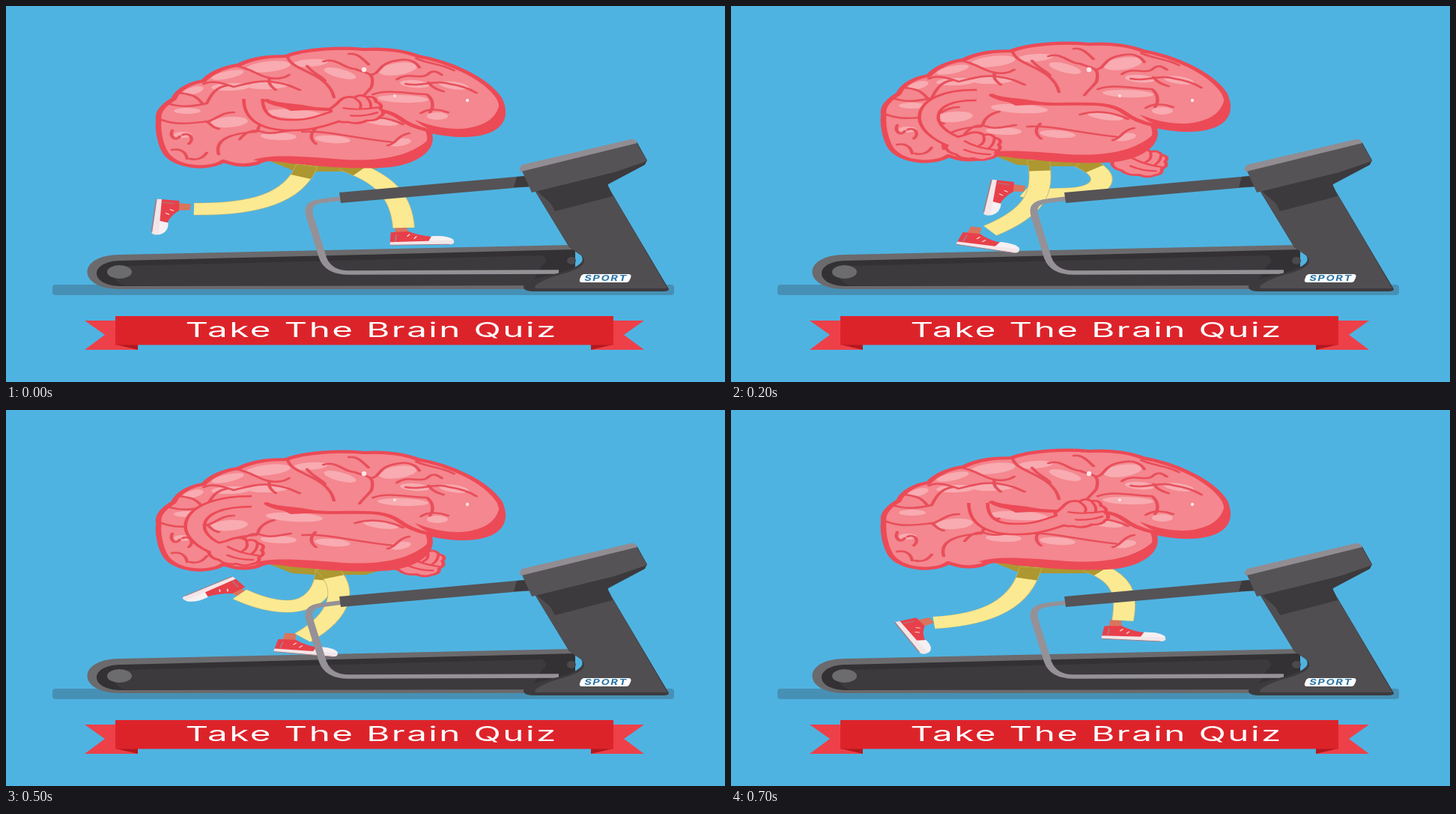
Recreate the animation shown at these times as an HTML page. Size 960 by 502 pixels, loop 800 ms.

```html
<!DOCTYPE html>
<html lang="en">
<head>
<meta charset="utf-8">
<title>Take The Brain Quiz</title>
<style>
  html, body { margin: 0; width: 100%; height: 100%; overflow: hidden; background: #4fb3e1; }
  svg { display: block; width: 100vw; height: 100vh; }
  text { font-family: Inter, "Open Sans", sans-serif; text-anchor: middle; }
</style>
</head>
<body>
<svg id="stage" viewBox="0 0 960 502" preserveAspectRatio="none"></svg>
<script>
const K = 1.8;          // the drawing is wider than tall, pens included
const STEP = 100;
const PINK = '#f4878f', RED = '#ec4a56', LINE = '#e84f5b', SHINE = '#f8abb1';
const YELLOW = '#fbea92', OLIVE = '#ad9730';
const GREY = '#555356', DARK = '#3c3a3d', EDGE = '#6b6a6d', STEEL = '#959197';

const fill = (d, color) => `<path d="${d}" fill="${color}"/>`;
const squeeze = d => d.replace(/(-?[\d.]+),/g, (m, x) => (x / K).toFixed(2) + ',');
const pen = (d, color, w, more = '') =>
  `<path d="${squeeze(d)}" transform="scale(${K},1)" fill="none" stroke="${color}" stroke-width="${w}" ${more}/>`;
const line = (d, w = 2.5, color = LINE) => pen(d, color, w, 'stroke-linecap="round" stroke-linejoin="round"');
const shine = ([x, y, rx, ry, a]) =>
  `<ellipse rx="${rx}" ry="${ry}" transform="translate(${x},${y}) rotate(${a})" fill="${SHINE}"/>`;
const place = (x, y, a, body, size = 1) =>
  `<g transform="translate(${x},${y}) scale(${K * size},${size}) rotate(${a})">${body}</g>`;

// ---- brain
const outline = 'M204,152 C201,140 214,130 224,124 C229,111 248,102 264,100 C272,90 292,81 310,79 ' +
  'C332,68 356,67 374,67 C400,57 445,55 478,58 C510,56 535,61 550,67 C590,74 640,95 659,124 ' +
  'C672,154 655,172 610,173 C592,173 577,170 564,167 C574,190 548,212 500,214 C460,216 420,212 380,208 ' +
  'C362,204 347,203 335,210 C315,215 302,211 290,207 C270,220 226,216 213,196 C206,185 202,165 204,152 Z';

const folds = [
  'M376,68 C382,88 430,88 438,122',
  'M402,80 C412,92 420,92 426,100',
  'M424,74 C440,68 452,84 466,84 C478,90 494,86 488,108 C484,114 478,118 472,126',
  'M487,92 C502,90 494,76 526,72 C540,70 548,76 552,82',
  'M458,64 C468,62 476,70 484,78',
  'M490,118 C510,110 540,118 562,118 C570,124 572,134 566,142',
  'M554,143 C566,136 580,138 590,142',
  'M522,98 C536,88 552,98 562,92 C570,84 576,88 582,92',
  'M534,104 C554,108 574,98 592,104 C606,106 618,110 628,116',
  'M564,102 C570,110 578,112 584,114',
  'M548,70 C566,78 584,78 598,86',
  'M216,130 C234,136 250,134 268,130 C274,118 280,108 296,106',
  'M264,104 C276,98 292,104 304,108 C326,102 344,98 360,102 C376,104 382,108 392,112',
  'M308,80 C328,84 338,94 352,96 C362,98 372,96 378,92',
  'M352,96 C350,102 352,106 360,112',
  'M232,116 C248,118 254,120 262,130',
  'M208,152 C228,160 250,156 270,154 C282,150 288,142 304,142',
  'M268,154 C276,160 276,162 284,164',
  'M284,198 C278,178 300,170 334,168',
  'M312,178 C320,168 330,164 342,168 C352,172 366,168 380,166',
  'M336,166 C338,156 348,150 358,148',
  'M413,164 C404,172 408,180 414,184',
  'M396,168 C430,166 460,176 518,182',
  'M510,186 C520,184 524,172 538,170',
  'M466,152 C486,146 510,148 530,158',
  'M222,166 C218,174 226,182 232,174',
  'M236,172 C246,168 252,178 244,184',
  'M242,204 C240,194 232,190 222,192',
  'M246,204 C254,206 262,204 268,196'
];

const shines = [
  [406, 76, 24, 5, -4], [350, 81, 30, 7, -6], [296, 92, 22, 5, -12], [300, 108, 26, 5, -2],
  [350, 106, 28, 5, -2], [250, 113, 14, 5, -14], [242, 140, 18, 4, 0], [298, 155, 25, 7, -4],
  [446, 90, 22, 6, 14], [523, 84, 26, 8, -8], [546, 104, 20, 5, 4], [598, 106, 20, 5, 8],
  [530, 124, 34, 5, 2], [576, 147, 14, 5, 0], [385, 144, 38, 6, 3]
];
const lowShines = [
  [500, 154, 24, 5, 8], [364, 174, 24, 5, 2], [436, 178, 24, 5, 4], [526, 182, 15, 5, -8], [236, 172, 12, 4, 0]
];

const brain = fill(outline, PINK) +
  shines.concat(lowShines).map(shine).join('') +
  fill('M330,206 C350,196 410,202 450,205 C500,208 542,200 564,178 C570,196 540,216 490,215 C440,215 380,208 330,206 Z', RED) +
  fill('M658,118 C664,146 640,163 604,164 C584,164 566,160 546,152 C564,168 590,174 610,174 C658,173 674,150 658,118 Z', RED) +
  folds.map(d => line(d)).join('') +
  line('M348,126 C360,134 384,136 430,138 C474,138 506,134 526,150 C544,164 576,171 612,170', 4, RED) +
  fill('M344,122 C362,132 390,128 424,138 L380,140 Z', RED) +
  pen(outline, RED, 4.2, 'stroke-linejoin="round"');

// ---- limbs
const shoe =
  fill('M-4,-8 L4,-8 L5,3 L-5,3 Z', '#d9745d') +
  fill('M-8,1 L5,0 Q12,6 23,8 L25,15 L-9,15 Z', '#e8404a') +
  fill('M22,7 Q34,6 38,12 Q39,16 36,17 L19,16 Z', '#f6f0f2') +
  fill('M-9,14 L38,13 Q40,18 35,18.5 L-9,18 Z', '#f3e6e8') +
  '<path d="M-9,18 L35,18.5 M-4,4 L-5,13" fill="none" stroke="#a07f88" stroke-width="1"/>' +
  '<path d="M6,4 L4,7 M11,7 L9,10" stroke="#f6d5d8" stroke-width="1"/>';

const leg = ([d, x, y, a]) =>
  place(x, y, a, shoe) +
  pen(d, '#c5b878', 16.6) + pen(d, YELLOW, 15.6) +
  pen(d, OLIVE, 16, 'pathLength="100" stroke-dasharray="14 200"');

const fistShape = 'M-16,-5 Q-10,-10 -8,-13 Q-3,-19 3,-15 Q7,-19 11,-14 Q17,-14 16,-7 Q20,-3 17,2 Q20,8 15,11 Q12,16 5,14 Q-2,18 -8,13 Q-14,13 -17,7 Z';
const fist = `<path d="${fistShape}" fill="${PINK}" stroke="${RED}" stroke-width="2.4"/>`;
const fingers = `<path d="M3,-14 Q7,-7 4,-2 M11,-13 Q13,-6 11,-1 M-7,-4 Q2,1 16,0 M-4,6 Q5,9 14,6"
  fill="none" stroke="${RED}" stroke-width="2" stroke-linecap="round"/>`;

const arm = ([d, x, y, a], w) =>
  pen(d, RED, w) + place(x, y, a, fist, 1.1) + pen(d, PINK, w - 5) + place(x, y, a, fingers, 1.1);

// ---- poses: lift, near arm, far arm, legs as [path, end x, end y, angle]
const forward = ['M330,124 C330,150 350,160 385,159 C410,159 432,150 452,143', 466, 139, -12];
const middle = ['M330,122 C284,146 316,182 368,180', 388, 178, 0];
const ahead = ['M540,192 C552,220 578,218 610,212', 631, 203, -4];

const poses = [
  { lift: 0, near: forward, legs: [
    ['M402,213 C384,256 334,272 251,271', 232, 268, 94],
    ['M452,212 C506,230 528,254 531,296', 528, 301, -2]] },
  { lift: -2, near: middle, legs: [
    ['M428,213 C425,262 384,276 316,246', 313, 242, 140],
    ['M426,210 C462,238 454,274 424,302', 410, 306, 7]] },
  { lift: -7, near: ['M328,119 C248,118 246,166 306,184', 323, 187, 18],
    far: ['M520,190 C526,200 530,204 535,206', 545, 209, 20], legs: [
    ['M468,208 C512,226 500,250 446,251 C428,252 410,252 392,247', 378, 243, 97],
    ['M410,205 C420,250 404,276 346,300', 324, 303, 14]] },
  { lift: -3, near: ['M332,123 C272,122 226,140 204,170', 209, 182, 100], far: ahead, legs: [
    ['M400,210 C390,258 350,284 283,290', 269, 289, 55],
    ['M484,208 C524,224 524,250 498,275', 484, 278, 26]] },
  { lift: 2, near: ['M332,128 C264,127 220,146 196,174', 199, 185, 100],
    far: ['M542,198 C553,223 580,222 612,211', 633, 200, -4], legs: [
    ['M402,215 C382,254 328,268 242,265', 228, 263, 110],
    ['M440,214 C496,232 508,262 506,302', 502, 305, 0]] },
  { lift: -1, near: ['M328,122 C238,122 232,170 290,188', 307, 189, 18],
    far: ['M524,190 C530,196 534,200 540,202', 548, 203, 20], legs: [
    ['M428,213 C425,262 380,277 312,246', 309, 242, 143],
    ['M426,210 C458,238 448,274 396,304', 378, 306, 8]] },
  { lift: -7, near: middle, legs: [
    ['M470,208 C514,226 504,250 450,251 C432,252 414,252 398,248', 385, 244, 94],
    ['M410,205 C420,252 390,280 326,299', 304, 302, 18]] },
  { lift: -3, near: forward, legs: [
    ['M400,210 C388,258 344,280 271,284', 255, 284, 65],
    ['M478,208 C522,224 530,244 523,281', 513, 288, 4]] }
];

const hips = fill('M342,203 L382,219 L412,221 L480,221 L514,211 L500,200 Z', OLIVE);

const runner = p =>
  `<g class="pose" opacity="0">${p.far ? arm(p.far, 14) : ''}` +
  `<g transform="translate(0,${p.lift})">${hips}</g>${p.legs.map(leg).join('')}` +
  `<g transform="translate(0,${p.lift})">${brain}</g>${arm(p.near, 16.5)}</g>`;

// ---- scenery
const belt =
  '<rect x="62" y="372" width="830" height="14" rx="4" fill="#4790b5"/>' +
  fill('M152,332 L756,319 L756,378 L152,378 C94,378 94,332 152,332 Z', EDGE) +
  fill('M154,340 L760,325 L760,373 L154,374 C110,374 110,340 154,340 Z', '#333134') +
  fill('M160,347 L716,333 Q726,340 716,346 L700,373 L160,373 C140,370 140,350 160,347 Z', DARK) +
  '<ellipse cx="151.5" cy="355" rx="16.5" ry="9" fill="#6c6b6e"/>';

const machine =
  pen('M448,257 L424,260 C404,262 402,270 406,282 L423,336 C428,350 440,356 458,356 L738,355', STEEL, 5.6) +
  fill('M445,249 L692,227 L700,241 L447,263 Z', GREY) +
  fill('M682,228 L696,227 L706,241 L678,242 Z', DARK) +
  fill('M704,243 L803,238 L808,248 L885,378 Q885,381 878,381 L702,381 Q690,380 691,374 C700,360 744,360 764,346 Q773,340 768,333 L752,322 Z', DARK) +
  fill('M704,243 L809,250 L883,377 L708,377 C700,374 720,364 742,358 C774,350 776,340 768,333 L752,322 Z', '#504e51') +
  fill('M726,261 L803,240 L810,254 L733,274 Z', DARK) +
  '<ellipse cx="755" cy="340" rx="6" ry="5" fill="#4b494c"/>' +
  fill('M688,218 L842,181 L856,206 L853,212 L804,238 L802,244 L728,264 L704,243 Z', DARK) +
  fill('M688,218 L842,183 L856,207 L812,222 L702,249 Z', GREY) +
  fill('M685,218 L689,212 L834,178 Q840,177 843,183 L688,221 Z', '#918d92') +
  '<path d="M771,358 H831 Q836,358 834,363 L832,367 Q831,369 827,369 H769 Q765,369 766,365 L768,360 Z" fill="#fff"/>' +
  '<text transform="translate(801,367.3) scale(1.4,1)" font-size="10.5" font-weight="700" font-style="italic" letter-spacing="1.1" fill="#2b74a4">SPORT</text>';

const ribbon =
  fill('M105,420 H160 L176,459 H105 L132,439 Z M852,420 H797 L781,459 H852 L825,439 Z', '#ee4048') +
  fill('M146,452 H176 V459 Z M811,452 H781 V459 Z', '#b4181f') +
  '<rect x="146" y="414" width="665" height="38.5" fill="#dd232a"/>' +
  '<text transform="translate(488,442) scale(1.76,1)" font-size="27" font-weight="400" letter-spacing="1.4" fill="#fff">Take The Brain Quiz</text>';

const specks = [[478, 85, 3.2], [519, 120, 2], [616, 126, 2.2]]
  .map(([x, y, r]) => `<circle cx="${x}" cy="${y}" r="${r}" fill="#fbe3e4"/>`).join('');

document.getElementById('stage').innerHTML =
  belt + poses.map(runner).join('') + specks + machine + ribbon;

// ---- motion: one hard cut per step
const n = poses.length;
document.querySelectorAll('.pose').forEach((g, i) => g.animate([
  { opacity: 1, offset: 0 }, { opacity: 1, offset: 1 / n },
  { opacity: 0, offset: 1 / n }, { opacity: 0, offset: 1 }
], { duration: n * STEP, delay: (i - n) * STEP, iterations: Infinity }));
</script>
</body>
</html>
```
